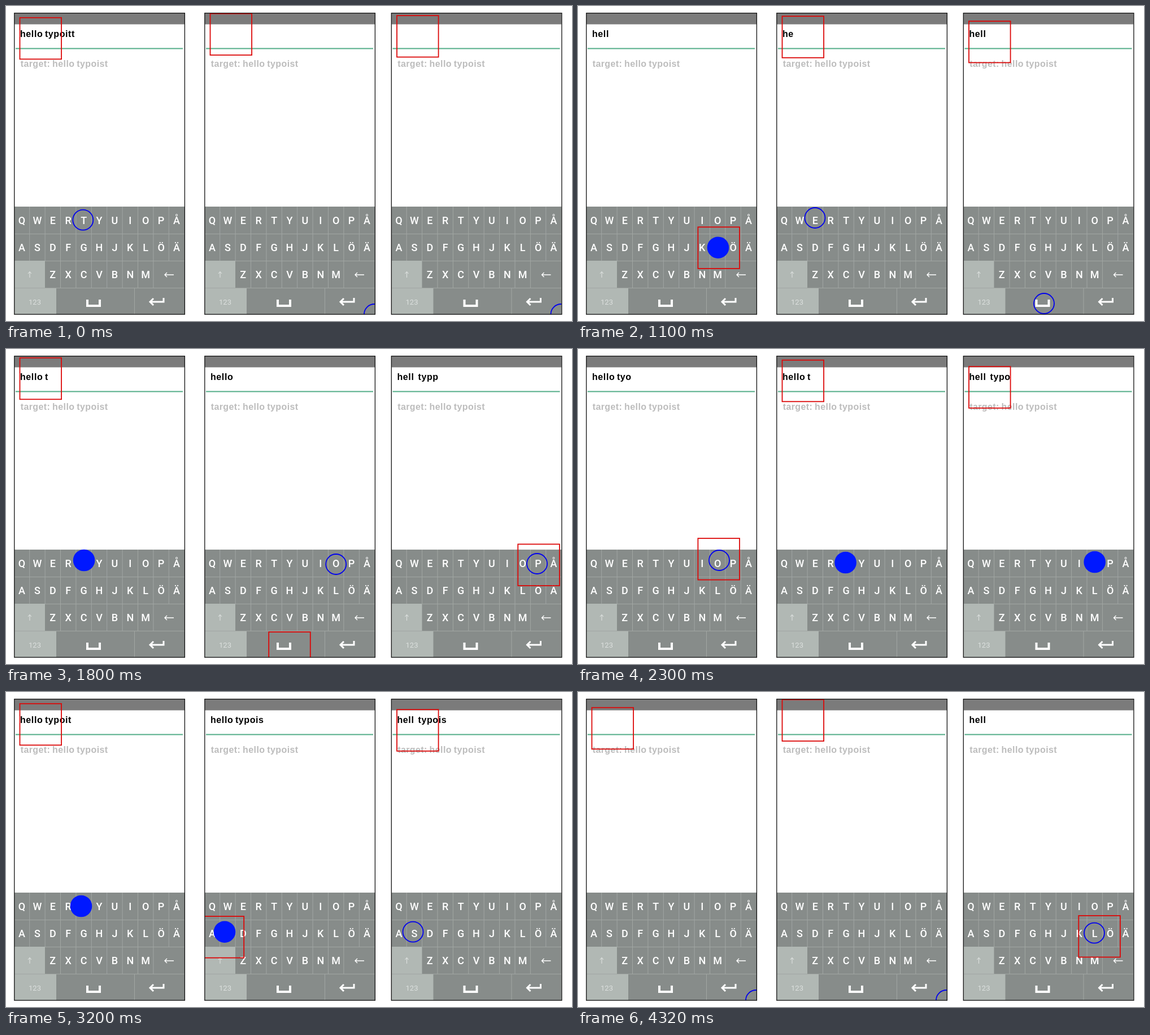
An HTML page that plays this animation: 1002 px wide and 559 px high, repeating every 4430 ms.

```html
<!DOCTYPE html>
<html lang="en">
<head>
<meta charset="utf-8">
<title>Typing panels</title>
<style>
html, body { margin: 0; width: 100%; height: 100%; overflow: hidden; background: #fff; }
svg { display: block; }
text { white-space: pre; }
.key { font: 500 18px Roboto, sans-serif; fill: #fff; text-anchor: middle; }
.num { font: 400 13px Roboto, sans-serif; fill: #dce0de; text-anchor: middle; }
.typed, .goal { font: bold 16px "Liberation Sans", sans-serif; }
.typed { letter-spacing: .6px; word-spacing: -1.5px; }
.goal { fill: #bdbdbd; letter-spacing: .4px; word-spacing: -1px; }
.icon { fill: none; stroke: #fff; }
</style>
</head>
<body>
<svg id="stage" width="1002" height="559" viewBox="0 0 1002 559">
  <defs><clipPath id="screen"><rect x="15" y="13" width="301" height="534"/></clipPath></defs>
</svg>
<script>
const stage = document.getElementById('stage');
const ROWS = ['QWERTYUIOPÅ', 'ASDFGHJKLÖÄ', '  ZXCVBNM'];
const PITCH = 27.4;
// _ space, < backspace, > enter, $ rest corner, @ text field
const SPOTS = { _: [157, 525], '<': [288, 476.5], '>': [268, 525], $: [315, 547], '@': [61.3, 57] };
ROWS.forEach((row, r) => [...row].forEach((c, i) => {
  if (c !== ' ') SPOTS[c] = [28 + PITCH * i, 380 + 48.2 * r];
}));

// Each step: tick, optional ~ (hover only), key, optional offset
const PANELS = [
  { x: 0, from: 5, span: 37,
    finger: '5$ 6~$ 8H 9E 10L 11L0.8,0.5 13O 15_ 18T0.5,-5 20Y 22O2.8,-5 26<0,-1 28P 29O 30I 32T-4.6,0 36T-1.3,-0.3 40>',
    eye: '5@0,5 6@0,7.5 7H 9L2,0.9 13O 14_ 16@0,-4.5 19Y 21O2,-7.2 25< 27P 29I 30@0,0.5' },
  { x: 337, from: -1, span: 43,
    finger: '-1$ 1~$ 3H 4L 6~<1.3,-2.5 7<1.3,-2.5 10E-0.3,-4 13L 15L 17O0,2 20_ 23T-1,-1 25Y 27P 28O 29I 32S-5.4,-2.5 35T 39>',
    eye: '-1@0,-6.7 2H 4L4.8,-7.5 7< 9E 10@0,-2 13L 16O 18_8,14 20@0,-0.5 24Y 27P 29I 31S-8,6.7 34T 36@0,-1' },
  { x: 667.5, from: -1, span: 37,
    finger: '-1$ 0~$ 2H 3E 4L 5L-0.7,-0.5 11~_0.5,3 12_0.5,3 13_0.5,3 14T 15Y 16P 17P-2,1 20< 23O0,-2 27I 31S-2.4,-2.5 33T 35>',
    eye: '-1@0,-3.2 1H 2E 4L8.4,5.5 8@0,6.7 13_ 14T 16P1,3.2 19< 21O 22@0,11 26I 28@0,11 33T' }
];

const parse = spec => spec.split(' ').map(s => {
  const [, at, hover, key, dx = 0, dy = 0] = s.match(/^(-?\d+)(~?)(\D)(?:(-?[\d.]+),(-?[\d.]+))?$/);
  const [x, y] = SPOTS[key];
  return { at: +at, tap: !hover && key !== '$', key, x: x + +dx, y: y + +dy };
});

function add(parent, tag, attrs, text) {
  const el = document.createElementNS('http://www.w3.org/2000/svg', tag);
  for (const k in attrs) el.setAttribute(k, attrs[k]);
  if (text) el.textContent = text;
  return parent.appendChild(el);
}

function drawKeyboard(g) {
  const box = (x, y, width, height, fill) => add(g, 'rect', { x, y, width, height, fill });
  const icon = (d, width, more) => add(g, 'path', { class: 'icon', d, 'stroke-width': width, ...more });
  box(15, 356, 302, 192, '#878c8a');
  box(15, 452, 54, 48, '#b1b8b4');
  box(15, 500, 74, 48, '#b1b8b4');
  let lines = 'M15 404.5H316M69 452.5H316M15 500.5H316M227.5 500V547';
  for (let i = 1; i < 11; i++) {
    const x = (14.3 + PITCH * i).toFixed(1);
    lines += `M${x} 356V452`;
    if (i > 2 && i < 10) lines += `M${x} 452V500`;
  }
  icon(lines, 1, { style: 'stroke:#a1a6a3' });
  for (const c in SPOTS) if (/[A-ZÅÄÖ]/.test(c)) {
    add(g, 'text', { class: 'key', x: SPOTS[c][0], y: SPOTS[c][1] + 7 }, c);
  }
  add(g, 'text', { class: 'num', x: 51, y: 529.5 }, '123');
  icon('M42 482V472M39 475L42 471.5L45 475', 1.1, { style: 'stroke:#dce0de' });
  icon('M297 477H281M285 473L281 477L285 481', 1.4);
  icon('M144 521V532H166V521', 4);
  icon('M279 518V525H256M261 519L255 525L261 531', 3);
}

function buildPanel(p) {
  const root = add(stage, 'g', { transform: `translate(${p.x})` });
  const g = add(root, 'g', { 'clip-path': 'url(#screen)' });
  add(g, 'rect', { x: 15, y: 13, width: 302, height: 19.5, fill: '#7b7b7b' });
  add(g, 'path', { d: 'M17 75.5H313', stroke: '#55ad88', 'stroke-width': 2 });
  const typed = add(g, 'text', { class: 'typed', x: 25, y: 55 });
  add(g, 'text', { class: 'goal', x: 25.7, y: 108 }, 'target: hello typoist');
  drawKeyboard(g);
  const eye = add(g, 'rect', { width: 73.6, height: 73.6, fill: 'none', stroke: '#dc0808', 'stroke-width': 1.8 });
  const dot = add(g, 'circle', { 'stroke-width': 1.8 });
  add(root, 'rect', { x: 14.8, y: 12.6, width: 301.6, height: 534.6, fill: 'none', stroke: '#111', 'stroke-width': 1.3 });
  return { ...p, typed, eyeBox: eye, dot, finger: parse(p.finger), eye: parse(p.eye) };
}

function fingerAt(steps, tick) {
  const i = steps.findLastIndex(s => s.at <= tick);
  const a = steps[i], b = steps[i + 1] || a;
  const leave = a.at + (a.tap ? 1 : 0);
  let u = b.at > leave ? Math.min(1, Math.max(0, (tick - leave) / (b.at - leave))) : 0;
  u = u * u * (3 - 2 * u);
  return { x: a.x + (b.x - a.x) * u, y: a.y + (b.y - a.y) * u, down: a.tap && a.at === tick };
}

function textAt(steps, tick) {
  return steps.filter(s => s.tap && s.at <= tick).reduce((out, { key }) =>
    key === '<' ? out.slice(0, -1) :
    key === '>' ? out :
    out + (key === '_' ? ' ' : key.toLowerCase()), '');
}

function updatePanel(p, n) {
  const tick = (n - p.from + p.span) % p.span + p.from;
  const f = fingerAt(p.finger, tick);
  const e = p.eye.findLast(s => s.at <= tick);
  p.typed.textContent = textAt(p.finger, tick);
  p.eyeBox.setAttribute('x', e.x - 36.8);
  p.eyeBox.setAttribute('y', e.y - 36.8);
  p.dot.setAttribute('cx', f.x);
  p.dot.setAttribute('cy', f.y);
  p.dot.setAttribute('r', f.down ? 18.4 : 18);
  p.dot.setAttribute('fill', f.down ? '#0018ff' : 'none');
  p.dot.setAttribute('stroke', f.down ? '#0018ff' : '#0000ee');
}

const panels = PANELS.map(buildPanel);
const LOOP = 4430, LAST = 4320;
const start = performance.now();

function render(ms) {
  const t = ms % LOOP;
  const n = t < LAST ? Math.min(42, Math.floor(t / 100)) : 43;
  panels.forEach(p => updatePanel(p, n));
}

function frame(now) {
  render(Math.max(0, now - start));
  requestAnimationFrame(frame);
}
render(0);
requestAnimationFrame(frame);
</script>
</body>
</html>
```
